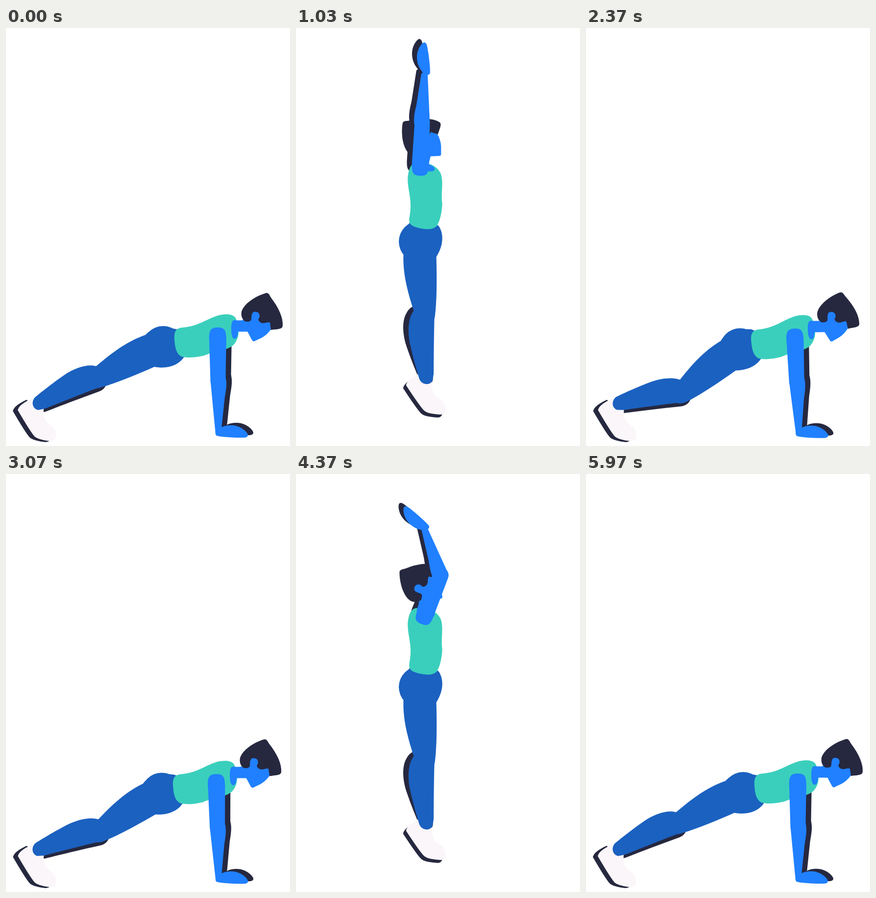
These frames come from a looping animation (580 px wide and 850 px high, 6010 ms). An HTML page with a canvas:

```html
<!DOCTYPE html>
<html lang="en">
<head>
<meta charset="utf-8">
<title>Burpee</title>
<style>
html, body { margin: 0; width: 100%; height: 100%; overflow: hidden; background: #fff; }
canvas { display: block; }
</style>
</head>
<body>
<canvas id="stage" width="580" height="850"></canvas>
<script>
const ctx = document.getElementById('stage').getContext('2d');
const PERIOD = 3005; // one burpee, ms
const DARK = '#26283f', SKIN = '#2080ff', PANTS = '#1b61c0', SHIRT = '#3acfbc', SHOE = '#fbf6f9';

// Shapes are drawn in plank position; joints are given in the same space.
const J = {
  waist: [323, 643], hip: [322, 645], knee: [185, 709], ankle: [67, 764],
  shoulder: [433, 626], elbow: [434, 716], wrist: [434, 818], head: [509, 595]
};
const S = {
  thigh: 'M178 690L185 687C215 662 245 638 285 624C296 611 318 606 346 612C364 614 372 644 363 670C352 686 330 694 303 689C260 708 220 724 190 732C158 738 155 700 178 690Z',
  shin: 'M183 688C165 683 140 692 120 705C95 722 70 742 58 752C50 762 55 776 66 777L80 774C115 760 150 746 190 731C212 722 208 692 183 688Z',
  shoe: 'M24 777Q26 766 52 754L77 774Q75 797 87 805Q102 814 102 829Q101 841 90 840Q63 837 57 829Q48 818 24 777Z',
  torso: 'M344 634C343 616 347 610 362 609C395 606 410 591 435 584C450 581 466 581 470 592C478 612 477 632 464 645C450 657 425 657 405 666C385 671 368 671 358 668C347 662 345 648 344 634Z',
  collar: 'M467 594C473 594 474 602 474 613C474 624 472 632 467 632C462 632 460 624 460 613C460 602 461 594 467 594Z',
  face: 'M482 594L500 588L540 597L541 613Q533 624 522 630L507 637Q504 638 502 634L493 617Z',
  hair: 'M531 539C536 538 538 543 541 548C558 570 566 590 565 605C565 613 555 612 541 614L539 599C533 597 530 601 523 600C516 598 516 594 514 590L502 592C499 598 494 597 489 597C481 592 480 584 481 577C486 560 510 545 531 539Z',
  ear: 'M501 592C502 588 500 577 509 577C518 577 520 586 516 591C513 596 517 600 512 606L494 604C496 597 500 598 501 592Z',
  arm: 'M415 634C414 612 420 609 433 609C446 609 450 614 450 634L449 716A15.5 15.5 0 0 1 418 716Z',
  forearm: 'M418 716C420 698 446 698 448 707C453 720 450 736 447 752L440 815L428 826Z',
  hand: 'M428 818L440 812C452 806 468 807 478 812C488 817 495 825 494 829C492 834 485 833 470 833C455 832 440 832 430 829C427 827 428 822 428 818Z'
};
for (const k in S) S[k] = new Path2D(S[k]);

// Poses: joint positions, turns in degrees, shrug = shoulder shift on the torso
const plank = { waist: J.waist, lean: 0, nod: 0, ankle: J.ankle, foot: 0, wrist: J.wrist, palm: 0, shrug: [0, 0] };
const crouch = { waist: [258, 672], lean: -8, nod: -26, ankle: [277, 763], foot: 0, wrist: [438, 822], palm: 1, shrug: [6, 2] };
const load = { ...crouch, waist: [274, 671] };
const rise = { waist: [252, 600], lean: -45, nod: -45, ankle: [268, 788], foot: -48, wrist: [358, 600], palm: 30, shrug: [12, -8] };
const reach = { waist: [254, 478], lean: -74, nod: -65, ankle: [267, 760], foot: -3, wrist: [262, 139], palm: -100, shrug: [30, -24] };
const fold = { ...reach, nod: -74, wrist: [262, 162], palm: -142, shrug: [26, -14] };
const drop = { ...rise, wrist: [455, 520], palm: -10 };

const BODY = [[0, plank], [500, crouch], [795, rise], [960, reach], [1290, reach], [1365, fold],
  [1440, fold], [1650, drop], [1870, crouch], [2065, load], [2480, plank], [PERIOD, plank]];
const FEET = [[0, plank], [60, plank], [350, crouch], [540, crouch], [680, rise], [860, rise], [940, reach],
  [1465, reach], [1540, rise], [1740, rise], [1865, crouch], [2080, crouch], [2380, plank], [PERIOD, plank]];

const add = (a, b) => [a[0] + b[0], a[1] + b[1]];
const sub = (a, b) => [a[0] - b[0], a[1] - b[1]];
const mix = (a, b, u) => a.map((x, i) => x + (b[i] - x) * u);
const angle = (a, b) => Math.atan2(b[1] - a[1], b[0] - a[0]);
const turn = (v, r) => [v[0] * Math.cos(r) - v[1] * Math.sin(r), v[0] * Math.sin(r) + v[1] * Math.cos(r)];

// Tangent that never overshoots
function tangent(keys, i) {
  if (i === 0 || i === keys.length - 1) return 0;
  const slope = n => (keys[n + 1][1] - keys[n][1]) / (keys[n + 1][0] - keys[n][0]);
  const a = slope(i - 1), b = slope(i);
  return a * b <= 0 ? 0 : 2 * a * b / (a + b);
}

function spline(keys, t) {
  let i = 0;
  while (i < keys.length - 2 && t >= keys[i + 1][0]) i++;
  const [t0, a] = keys[i], [t1, b] = keys[i + 1], d = t1 - t0, u = (t - t0) / d, v = 1 - u;
  return a * (1 + 2 * u) * v * v + b * u * u * (3 - 2 * u)
    + d * u * v * (v * tangent(keys, i) - u * tangent(keys, i + 1));
}

const turned = (line, name, t) => spline(line.map(([at, pose]) => [at, pose[name]]), t) * Math.PI / 180;
const placed = (line, name, t) => [0, 1].map(c => spline(line.map(([at, pose]) => [at, pose[name][c]]), t));

// Height of the jump above the ground
const lift = t => Math.max(0, 82 * (1 - ((t - 1200) / 265) ** 2));

// Middle joint of a two-bone limb
function bend(from, to, l1, l2, side) {
  const [dx, dy] = sub(to, from), d = Math.hypot(dx, dy);
  if (d >= l1 + l2) return mix(from, to, l1 / (l1 + l2));
  const a = (d * d + l1 * l1 - l2 * l2) / (2 * d);
  const h = side * Math.sqrt(Math.max(0, l1 * l1 - a * a));
  return add(from, [(dx * a + dy * h) / d, (dy * a - dx * h) / d]);
}

function part(shape, color, rest, at, rot) {
  ctx.save();
  ctx.translate(...at);
  ctx.rotate(rot);
  ctx.translate(-rest[0], -rest[1]);
  ctx.fillStyle = color;
  ctx.fill(shape);
  ctx.restore();
}

function bone(shape, color, a, b, from, to) {
  part(shape, color, J[a], from, angle(from, to) - angle(J[a], J[b]));
}

function arm(shoulder, wrist, rot, color) {
  const elbow = bend(shoulder, wrist, 89, 100, -1);
  bone(S.arm, color, 'shoulder', 'elbow', shoulder, elbow);
  bone(S.forearm, color, 'elbow', 'wrist', elbow, wrist);
  part(S.hand, color, J.wrist, wrist, rot);
}

function draw(t) {
  const up = [0, -lift(t)];
  const waist = add(placed(BODY, 'waist', t), up);
  const wrist = add(placed(BODY, 'wrist', t), up);
  const ankle = add(placed(FEET, 'ankle', t), up);
  const lean = turned(BODY, 'lean', t), nod = turned(BODY, 'nod', t);
  const palm = turned(BODY, 'palm', t), foot = turned(FEET, 'foot', t);

  const onTorso = pt => add(waist, turn(sub(pt, J.waist), lean));
  const shoulder = onTorso(add(J.shoulder, placed(BODY, 'shrug', t)));
  const skull = onTorso(J.head);
  const hip = add(waist, [-1, 2]);
  const knee = bend(hip, ankle, 150, 130, 1);

  // Far limbs shift from one side to the other as the body gets upright
  const upright = lean / (reach.lean * Math.PI / 180);
  const farArm = mix([11, -5], [-10, -7], upright);
  const farKnee = mix([1, 8], [-14, 2], upright);
  const farFoot = mix([-10, 2], [-6, 6], upright);

  ctx.fillStyle = '#fff';
  ctx.fillRect(0, 0, 580, 850);

  arm(add(shoulder, farArm), add(wrist, farArm), palm, DARK);
  bone(S.shin, DARK, 'knee', 'ankle', add(knee, farKnee), add(ankle, [1, 6]));
  part(S.shoe, DARK, J.ankle, add(ankle, farFoot), foot);

  part(S.shoe, SHOE, J.ankle, ankle, foot);
  bone(S.thigh, PANTS, 'hip', 'knee', hip, knee);
  bone(S.shin, PANTS, 'knee', 'ankle', knee, ankle);
  ctx.beginPath();
  ctx.arc(hip[0] - 1, hip[1] + 3, 42, 0, 7);
  ctx.fillStyle = PANTS;
  ctx.fill();

  part(S.torso, SHIRT, J.waist, waist, lean);
  part(S.collar, SKIN, J.waist, waist, lean);
  ctx.beginPath();
  ctx.moveTo(...onTorso([468, 606]));
  ctx.lineTo(...add(skull, turn(sub([502, 606], J.head), nod)));
  ctx.lineWidth = 23;
  ctx.strokeStyle = SKIN;
  ctx.stroke();
  part(S.face, SKIN, J.head, skull, nod);
  part(S.hair, DARK, J.head, skull, nod);
  part(S.ear, SKIN, J.head, skull, nod);

  arm(shoulder, wrist, palm, SKIN);
}

const start = performance.now();
function tick() {
  draw((performance.now() - start) % PERIOD);
  requestAnimationFrame(tick);
}
tick();
</script>
</body>
</html>
```
